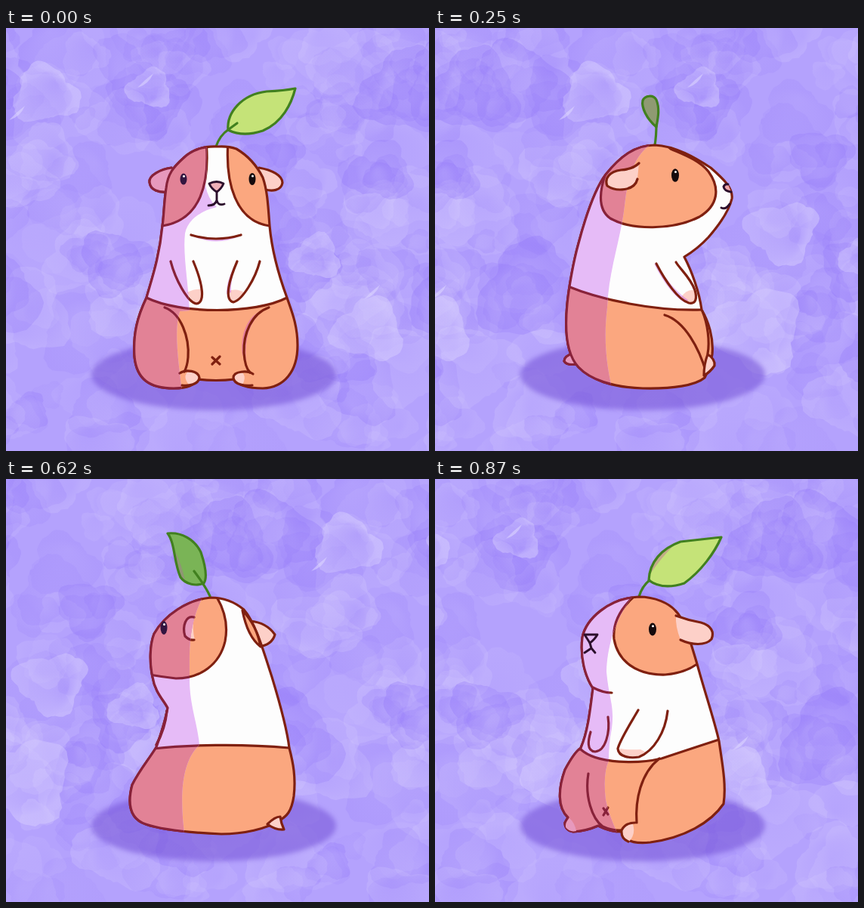
Animation, 560 px wide and 560 px high, one loop 1000 ms. Source, as an HTML page with a canvas:

```html
<!DOCTYPE html>
<html lang="en">
<head>
<meta charset="utf-8">
<title>Turning guinea pig</title>
<style>
html, body { margin: 0; width: 100%; height: 100%; overflow: hidden; background: #b3a0fd; }
canvas, svg { position: absolute; left: 0; top: 0; width: 560px; height: 560px; display: block; }
path { stroke-linecap: round; stroke-linejoin: round; }
</style>
</head>
<body>
<canvas id="wash" width="560" height="560"></canvas>
<svg id="stage" viewBox="0 0 560 560">
  <defs>
    <filter id="soft" x="-5%" y="-15%" width="110%" height="130%"><feGaussianBlur stdDeviation="3"/></filter>
  </defs>
  <ellipse cx="275" cy="459" rx="162" ry="47" fill="#7c5cdb" opacity=".64" filter="url(#soft)"/>
</svg>
<script>
const LIT = { line: '#7f2010', pink: '#fdd0c8', orange: '#fba77f', white: '#fdfdfd' };
const DIM = { line: '#88223a', pink: '#e799bd', orange: '#e28296', white: '#e6bbf7' };
const SHADE = 'rgb(171,17,232)', DARK = '#2c0f2c', STEM = '#41801f';
const STARTS = [0, 120, 250, 370, 500, 620, 750, 870], LOOP = 1000;

// Part kinds: b behind body, o orange patch, f plain pink, s soft shade, l line,
// w white limb, q orange fold, p outlined pink, t pink that stays lit, n nose
const front = {
  body: 'M280 157C258 156 244 163 234 173C222 184 214 193 212 212C209 232 209 250 207 262C203 305 192 335 186 357C174 382 168 405 170 435C173 465 190 477 222 477C238 477 250 474 253 465Q278 468 303 465C308 474 322 477 340 477C368 476 386 455 386 420C386 392 377 372 372 357C362 330 352 295 349 262C347 235 346 215 340 198C332 182 322 170 305 160Q294 156 280 157Z',
  parts: [
    ['b', 'M219 185C205 187 189 195 190 204C191 215 203 218 214 217'],
    ['b', 'M335 185C352 188 366 195 366 205C364 216 352 216 343 214'],
    ['o', 'M265 150C270 205 258 254 207 262L190 262V150Z'],
    ['o', 'M294 150C290 205 304 256 349 262L370 262V150Z'],
    ['o', 'M186 357C230 379 330 379 372 357L400 357V490H150V357Z'],
    ['f', 'M240 350Q250 345 260 346Q263 362 253 365Q246 364 240 350Z'],
    ['f', 'M294 348Q306 344 315 350Q306 364 300 362Q293 358 294 348Z'],
    ['s', 'M305 310Q291 335 292 352L298 350Q297 335 305 310Z'],
    ['s', 'M246 275Q278 285 311 275Q278 290 246 275Z'],
    ['s', 'M340 373C318 382 310 408 313 432L319 452C314 415 320 385 348 370Z'],
    ['l', 'M218 309C224 332 240 363 252 365C264 364 261 340 248 309'],
    ['l', 'M306 309C296 332 288 360 301 363C313 360 330 332 336 309'],
    ['l', 'M245 274Q278 284 311 274M273 436L283 445M283 435L273 445'],
    ['l', 'M210 370C232 378 243 410 241 436Q240 448 236 455'],
    ['l', 'M348 370C325 378 314 405 315 430C316 445 319 452 323 456'],
    ['f', 'M240 456Q255 454 256 463Q254 472 242 472Q234 462 240 456Z'],
    ['f', 'M314 457Q301 455 301 463Q302 472 313 472Q318 464 314 457Z'],
    ['l', 'M230 457C238 451 255 454 256 463C255 472 242 474 233 473'],
    ['l', 'M327 458C320 453 301 454 301 463C302 473 318 474 326 473'],
    ['n', 'M269 206Q279 201 288 206Q285 213 279 217Q272 213 269 206Z', '#efb0b8'],
    ['n', 'M279 217V228Q277 235 268 235M279 228Q281 236 289 233']
  ],
  shade: 'M265 150C267 185 265 200 264 208Q267 226 279 237C257 242 240 255 237 272C234 300 241 335 243 374L230 375C222 400 228 440 234 490H150V150Z',
  eyes: [[235, 200, 4.5, 7.5], [326, 200, 4.5, 8]],
  stem: 'M278 157Q283 142 295 134L306 126',
  leaf: 'M294 135C292 112 312 88 345 84Q368 83 383 80C378 100 366 125 340 136C322 142 306 141 294 135Z',
  green: '#c5e378'
};

const sideRight = {
  body: 'M291 155C318 156 345 172 365 185C382 200 395 212 393 226C389 243 375 262 362 277C350 290 340 297 330 303C340 322 350 350 353 373C362 388 369 410 367 432Q364 450 357 463C345 473 315 478 275 477C235 476 205 465 190 449C172 430 172 395 175 365C177 345 183 310 190 285C202 240 214 210 226 194C245 170 265 155 291 155Z',
  parts: [
    ['b', 'M183 431Q171 434 171 441Q174 447 188 445'],
    ['o', 'M226 192C218 215 215 240 232 252C260 268 315 268 350 250C375 235 378 212 362 190C350 175 330 168 312 160L291 140L240 160Z'],
    ['o', 'M176 342C220 360 290 375 353 373L400 373V490H140V342Z'],
    ['f', 'M326 356Q333 346 342 347Q349 362 338 364Q331 362 326 356Z'],
    ['s', 'M290 312C302 336 318 358 332 364L335 360C320 350 305 332 294 313Z'],
    ['l', 'M293 312C305 335 322 360 336 364C346 366 347 357 344 347C338 330 325 320 319 310'],
    ['l', 'M304 380C331 388 350 425 359 456M354 375C361 392 364 415 361 431'],
    ['p', 'M361 432Q371 438 370 447Q364 456 356 460Q356 445 361 432'],
    ['t', 'M270 179Q262 187 246 188C231 190 224 199 228 209C240 217 264 216 268 200'],
    ['n', 'M392 217Q383 216 382 210Q384 206 388 207', '#eda5ab'],
    ['n', 'M390 233Q385 241 379 238']
  ],
  shade: 'M291 150C258 170 254 210 251 235C246 280 230 320 228 370C223 410 226 450 238 490H140V150Z',
  eyes: [[318, 195, 5, 8.8]],
  stem: 'M291 155Q293 143 293 128',
  leaf: 'M293 131C280 120 273 105 275 96C278 89 289 88 293 95C298 107 295 120 293 131Z',
  green: '#8f9a72'
};

const backRight = {
  body: 'M283 156C305 156 322 165 335 174C355 184 370 196 367 216C365 236 356 252 350 265C342 280 340 292 344 304C347 325 352 342 357 360C380 388 392 420 386 452C372 470 335 477 295 476C255 475 220 468 200 456C178 435 169 400 172 365C175 330 183 300 192 272C203 245 215 225 226 207C240 180 258 157 283 156Z',
  parts: [
    ['b', 'M238 191C222 197 207 199 205 206Q206 219 221 220'],
    ['o', 'M281 150C268 170 268 205 278 232C288 255 318 273 356 252L385 250V140Z'],
    ['o', 'M172 349C205 346 235 375 357 361L400 361V490H150V349Z'],
    ['l', 'M236 191Q232 207 215 228'],
    ['w', 'M335 299C334 320 345 345 352 350Q360 353 358 345Q352 325 343 305'],
    ['p', 'M309 182C301 187 299 208 305 218C312 218 317 212 316 203Q317 190 309 182Z'],
    ['s', 'M308 183C301 190 300 210 305 217Q306 200 308 183Z'],
    ['p', 'M194 444Q183 455 184 463Q188 468 194 462Q200 456 201 450']
  ],
  shade: 'M283 150C262 185 245 245 238 290C234 330 231 345 230 365Q229 420 226 490H140V150Z',
  eyes: [[341, 198, 4.5, 9]],
  stem: 'M291 154Q288 142 277 136',
  leaf: 'M204 88C230 84 255 90 270 108C280 118 279 130 276 138C265 150 245 148 232 134C220 122 214 105 204 88Z',
  green: '#8f9674'
};

const back = {
  body: 'M278 157C256 157 242 165 232 176C217 195 210 230 204 262C196 305 186 335 181 355C170 382 166 410 172 436C182 464 225 475 277 475C330 475 374 464 384 436C389 410 384 382 375 355C367 330 356 295 350 262C345 230 340 198 325 176C314 164 298 157 278 157Z',
  parts: [
    ['b', 'M224 187C206 190 190 198 191 207C194 217 205 219 216 217'],
    ['b', 'M332 187C350 190 366 198 365 207C362 217 351 219 340 217'],
    ['o', 'M240 165C241 200 228 235 207 252L180 250V150Z'],
    ['o', 'M317 165C316 200 328 235 349 252L375 250V150Z'],
    ['o', 'M180 354C230 362 325 362 376 354L410 354V490H150V354Z'],
    ['l', 'M228 184Q226 204 213 220M328 184Q330 204 343 220'],
    ['p', 'M268 457Q266 468 274 473Q283 474 284 466Q284 460 281 456']
  ],
  shade: 'M258 150C240 190 240 240 238 290C238 320 242 340 242 358C230 385 229 430 234 490H140V150Z',
  eyes: [],
  stem: 'M277 157Q274 144 264 136',
  leaf: 'M264 135C266 112 246 88 215 84Q198 83 184 79C186 100 196 125 220 136C238 143 253 141 264 135Z',
  green: '#87a566'
};

const backLeft = {
  body: 'M271 157C290 157 303 163 315 173C330 190 340 225 352 262C362 295 372 330 375 356C380 375 384 395 381 420C378 440 372 447 360 453C345 463 315 470 285 470C240 468 205 464 185 457C165 450 160 432 167 405C177 385 190 370 199 355C205 338 211 320 214 303C209 293 197 282 194 262C190 245 190 220 196 205C210 180 240 160 271 157Z',
  parts: [
    ['b', 'M323 188Q345 190 356 206Q352 220 334 222'],
    ['o', 'M275 150C290 172 294 195 290 215C283 245 258 264 225 264Q207 262 190 259L170 259V140Z'],
    ['o', 'M195 357C240 352 310 350 375 356L400 356V490H150V357Z'],
    ['l', 'M213 307Q211 330 199 352'],
    ['q', 'M313 174C318 200 328 215 337 222Q332 194 313 174Z'],
    ['f', 'M249 183C238 180 233 195 237 208Q244 214 250 213Q246 198 249 183Z'],
    ['l', 'M249 183C238 180 233 195 237 208Q243 214 249 213'],
    ['p', 'M346 457Q356 447 363 447Q364 455 368 464Q357 465 346 457']
  ],
  shade: 'M264 150C240 190 243 230 243 265C243 300 254 325 256 352C232 375 228 420 239 490H140V150Z',
  eyes: [[209, 197, 4.5, 9]],
  stem: 'M270 155Q264 142 249 122',
  leaf: 'M214 72C232 70 250 80 258 97C264 115 267 130 262 138C252 142 238 140 231 130C222 110 224 85 214 72Z',
  green: '#7ab456',
  fold: ['M225 98Q232 112 237 134Q225 126 223 102Z', '#8f9674']
};

const sideLeft = {
  body: 'M266 160C290 159 312 165 325 178C337 200 355 235 366 275C374 310 380 335 380 355C382 385 380 415 375 436C355 455 320 472 270 473C240 474 215 468 203 467C188 467 183 458 188 449Q192 444 197 445C193 425 196 395 207 365C213 345 222 325 226 300C205 283 180 255 170 240C162 230 160 213 163 204C175 187 200 172 220 165C235 161 250 160 266 160Z',
  parts: [
    ['o', 'M326 180C335 205 333 235 322 252C305 270 270 272 240 266C205 255 180 235 176 215C178 200 186 190 205 172L200 140H330Z'],
    ['o', 'M205 368C225 358 290 352 380 353L400 353V490H150V368Z'],
    ['w', 'M248 321C238 338 228 355 215 360C203 362 200 354 203 347C212 330 222 318 230 308'],
    ['l', 'M236 372C215 380 200 400 196 423'],
    ['p', 'M281 179Q290 190 305 192C320 194 325 203 319 209C310 216 297 215 287 208'],
    ['s', 'M281 180Q290 191 300 192Q302 203 310 212Q296 214 287 208Z'],
    ['p', 'M374 433Q369 438 367 446Q380 452 389 448Q384 438 374 433'],
    ['n', 'M164 211Q170 204 173 208Q172 214 165 218', '#d68aae'],
    ['n', 'M164 222L169 220M163 230Q167 234 172 231']
  ],
  shade: 'M244 150C228 195 224 235 232 265C240 290 260 320 261 350C240 375 238 430 250 490H140V150Z',
  eyes: [[239, 194, 5.5, 10]],
  stem: 'M265 158Q266 148 264 138',
  leaf: 'M264 140C264 120 268 105 275 95C285 85 298 80 307 73C302 95 297 118 284 128Q274 136 264 140Z',
  green: '#b9a886',
  fold: ['M306 75C302 95 297 118 284 128L272 136Q291 117 295 92Z', '#b9dc70']
};

const frontLeft = {
  body: 'M270 156C292 156 310 165 318 174C330 185 338 215 347 245C358 285 370 320 376 347C380 375 386 405 382 430C365 455 330 475 285 481C265 483 250 480 247 467Q232 467 216 459Q200 466 183 467Q172 465 172 455L176 448C162 435 163 410 172 385C180 370 187 360 193 356C202 335 205 310 209 277C198 260 192 235 195 210C200 185 230 158 270 156Z',
  parts: [
    ['o', 'M270 150C245 170 235 190 237 212C242 240 265 260 305 259Q330 257 347 245L380 245V140Z'],
    ['o', 'M193 358C215 378 270 377 300 370Q345 355 376 345L400 345V490H150V358Z'],
    ['f', 'M245 357Q258 359 272 358L280 362Q262 371 246 367Q241 364 245 357Z'],
    ['l', 'M209 276Q222 283 234 283M223 436L229 444M229 435L223 445'],
    ['l', 'M229 315C232 335 226 360 212 361C200 360 203 345 206 335'],
    ['l', 'M269 306C258 325 245 345 242 357C243 368 258 370 270 368C290 360 305 335 308 307'],
    ['l', 'M203 390C198 420 208 450 222 460Q235 466 247 465'],
    ['l', 'M297 370C272 390 265 425 267 455'],
    ['f', 'M262 457Q250 457 247 466Q247 478 257 480Q266 470 262 457Z'],
    ['l', 'M265 455Q252 455 247 465Q246 476 256 480'],
    ['f', 'M178 449Q172 455 173 461Q178 468 187 466Q185 455 178 449Z'],
    ['f', 'M319 181Q335 187 352 190C366 194 370 203 366 212C358 221 340 220 325 213Q318 195 319 181Z'],
    ['l', 'M319 181Q335 187 352 190C366 194 370 203 366 212C358 221 340 220 325 213'],
    ['n', 'M198 206H215Q211 213 205 217Z'],
    ['n', 'M205 217L207 224L212 230M207 224L198 230']
  ],
  shade: 'M266 150C240 180 228 220 227 255C230 290 238 300 234 330Q230 350 230 373Q222 390 226 425Q230 445 242 470V490H140V150Z',
  eyes: [[288, 199, 5, 8.5]],
  stem: 'M270 156Q274 142 284 134',
  leaf: 'M283 134C284 110 300 92 325 83Q352 80 379 77C370 98 352 122 330 138C312 144 295 143 283 134Z',
  green: '#c5e378',
  fold: ['M286 124Q290 98 314 90Q300 104 286 124Z', '#c2ab88']
};

const frontRight = {
  ...frontLeft,
  flip: true,
  shade: 'M296 150C318 195 310 245 318 290C326 330 318 360 330 400Q330 450 322 490H430V150Z',
  stem: 'M285 156Q286 142 292 133',
  leaf: 'M291 133C286 112 299 93 320 88Q334 86 345 84C343 108 328 129 310 137Q299 139 291 133Z',
  green: '#afc874',
  fold: null
};

const poses = [front, frontRight, sideRight, backRight, back, backLeft, sideLeft, frontLeft];

const path = (d, fill, stroke = 'none', w = 3.2) =>
  `<path d="${d}" fill="${fill}" stroke="${stroke}" stroke-width="${w}"/>`;

const eye = ([x, y, rx, ry]) =>
  `<ellipse cx="${x}" cy="${y}" rx="${rx}" ry="${ry}" fill="${x < 238 ? '#331540' : '#150a0c'}"/>` +
  `<circle cx="${x + 0.5}" cy="${y - ry / 2}" r="1.5" fill="#fff"/>`;

function drawPart([kind, d, fill], c) {
  switch (kind) {
    case 'f': return path(d, c.pink);
    case 's': return `<path d="${d}" fill="${SHADE}" opacity=".28"/>`;
    case 'w': return path(d, c.white, c.line);
    case 'n': return path(d, fill || 'none', DARK, 2.9);
    case 'o':
    case 'q': return path(d, c.orange, c.line);
    case 'l': return path(d, 'none', c.line);
    default: return path(d, c.pink, c.line);
  }
}

function drawPose(p, i) {
  const pick = (kinds, c) => p.parts.filter(a => kinds.includes(a[0])).map(a => drawPart(a, c)).join('');
  const coat = c => pick('b', c) + path(p.body, c.white) +
    `<g clip-path="url(#body${i})">${pick('o', c)}</g>` + path(p.body, 'none', c.line) + pick('fslwqp', c);
  const turn = p.flip ? ' transform="translate(558 0) scale(-1 1)"' : '';
  const fold = p.fold ? path(p.fold[0], p.fold[1]) : '';
  return `<g display="none">
    <clipPath id="body${i}"><path d="${p.body}"/></clipPath>
    <clipPath id="dim${i}"><path d="${p.shade}"/></clipPath>
    ${path(p.leaf, p.green)}${fold}${path(p.leaf, 'none', STEM)}${path(p.stem, 'none', STEM)}
    <g${turn}>${coat(LIT)}<g clip-path="url(#dim${i})">${coat(DIM)}</g>
      ${pick('tn', LIT)}${p.eyes.map(eye).join('')}</g>
  </g>`;
}

// Watercolour wash, tiled sideways
const TILE = 640, STEP = 80;
let seed = 71;
const rnd = () => (seed = (seed * 16807) % 2147483647) / 2147483647;
const tile = document.createElement('canvas');
tile.width = TILE;
tile.height = 560;
const tc = tile.getContext('2d');

function blob(x, y, r, rgb, a) {
  const p = rnd() * 6.3, q = rnd() * 6.3, pts = [];
  for (let i = 0; i < 64; i++) {
    const t = i / 64 * 2 * Math.PI;
    const k = r * (0.8 + 0.16 * Math.sin(3 * t + p) + 0.09 * Math.abs(Math.sin(4 * t + q)) + 0.05 * rnd());
    pts.push([k * 1.15 * Math.cos(t), k * Math.sin(t)]);
  }
  // Pigment gathers on one side and fades out on the other
  const gx = Math.cos(q) * r * 0.5, gy = Math.sin(q) * r * 0.5;
  for (const dx of [-TILE, 0, TILE]) {
    const cx = x + dx, g = tc.createRadialGradient(cx + gx, y + gy, 0, cx - gx, y - gy, r * 1.25);
    g.addColorStop(0, `rgba(${rgb},${a * 0.25})`);
    g.addColorStop(1, `rgba(${rgb},${a})`);
    tc.fillStyle = g;
    tc.beginPath();
    pts.forEach(([u, v]) => tc.lineTo(cx + u, y + v));
    tc.fill();
  }
}

function paintTile() {
  const deep = '142,114,248', pale = '217,208,254';
  tc.fillStyle = '#b4a2fd';
  tc.fillRect(0, 0, TILE, 560);
  for (let i = 0; i < 200; i++) {
    blob(rnd() * TILE, rnd() * 560, 14 + rnd() * 48, rnd() < 0.47 ? deep : pale, 0.1 + rnd() * 0.16);
  }
  const spots = [[590, 75, 60], [530, 85, 60], [495, 190, 42], [610, 350, 70], [145, 310, 46], [395, 320, 42]];
  for (const [x, y, r] of spots) {
    blob(x, y, r, deep, 0.3);
    blob(x + 8, y + 5, r * 0.65, deep, 0.2);
  }
  const glows = [[265, 400, 60], [410, 303, 32], [480, 400, 45], [190, 80, 28], [300, 270, 45], [52, 88, 42]];
  for (const [x, y, r] of glows) blob(x, y, r, pale, 0.45);
  tc.fillStyle = 'rgba(228,221,255,.5)';
  for (const [x, y] of [[15, 113], [185, 70], [485, 350]]) {
    tc.beginPath();
    tc.moveTo(x - 11, y + 9);
    tc.quadraticCurveTo(x - 2, y - 1, x + 10, y - 10);
    tc.quadraticCurveTo(x + 4, y + 5, x - 11, y + 9);
    tc.fill();
  }
}

const stage = document.getElementById('stage');
const wash = document.getElementById('wash').getContext('2d');
paintTile();
stage.insertAdjacentHTML('beforeend', poses.map(drawPose).join(''));
const groups = [...stage.querySelectorAll(':scope > g')];
let shown = -1;

function show(ms) {
  const t = ms % LOOP;
  const k = STARTS.filter(s => s <= t).length - 1;
  if (k === shown) return;
  shown = k;
  groups.forEach((g, i) => g.setAttribute('display', i === k ? 'inline' : 'none'));
  const x = k * STEP;
  wash.drawImage(tile, x, 0);
  wash.drawImage(tile, x - TILE, 0);
}

const begin = performance.now();
function tick() {
  show(performance.now() - begin);
  requestAnimationFrame(tick);
}
show(0);
requestAnimationFrame(tick);
</script>
</body>
</html>
```
